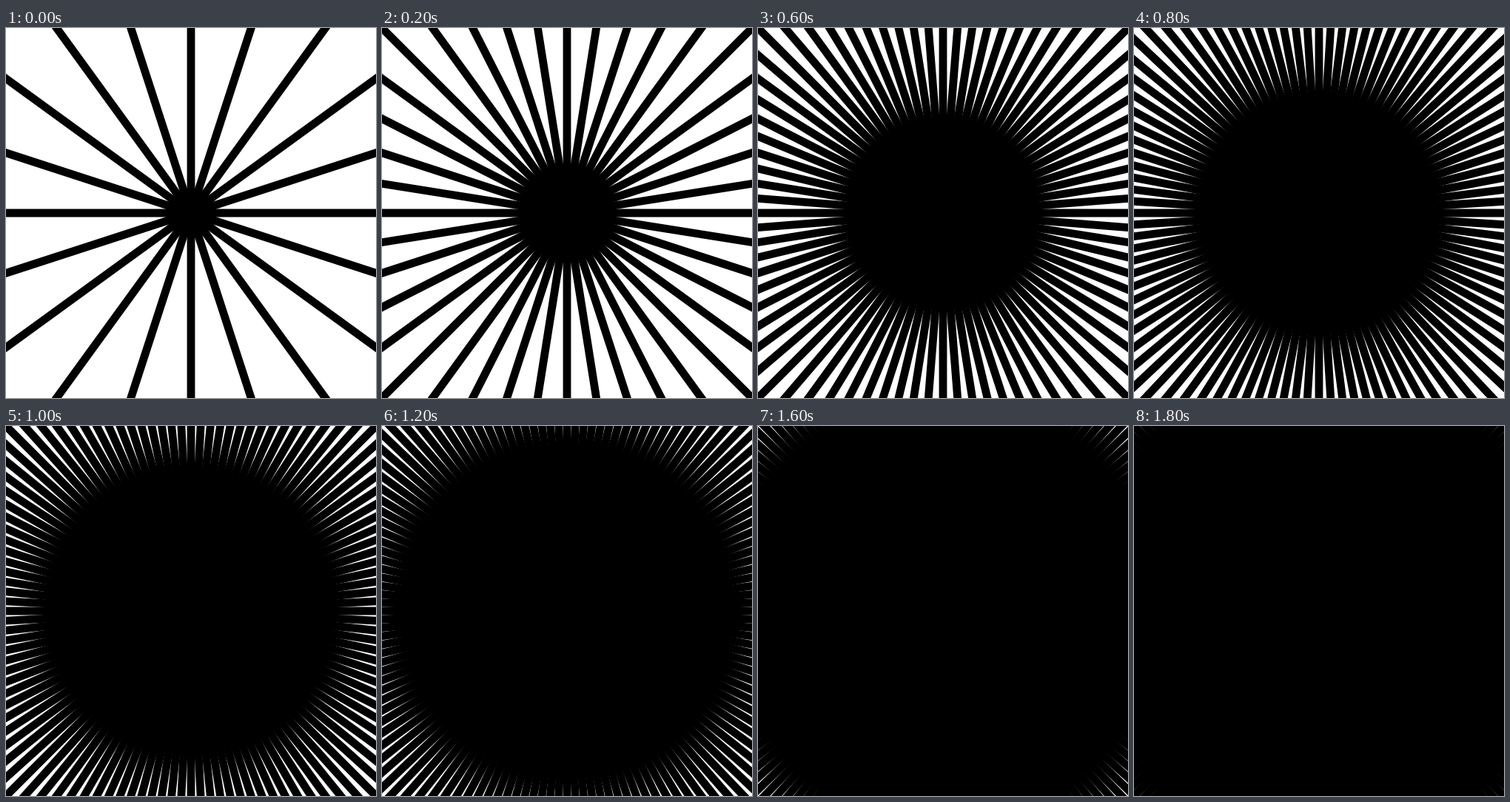
Write an HTML page with a canvas that moves like this. It is 500 px wide and 500 px high and loops after 2 s.

```html
<!DOCTYPE html>
<html lang="en">
<head>
<meta charset="utf-8">
<title>Rays</title>
<style>
  html, body { margin: 0; width: 100%; height: 100%; overflow: hidden; background: #fff; }
  canvas { display: block; width: 500px; height: 500px; }
</style>
</head>
<body>
<canvas id="stage" width="500" height="500"></canvas>
<script>
const SIZE = 500, CENTER = SIZE / 2, REACH = 400;
const STEPS = 10, STEP_MS = 200, RAYS_PER_STEP = 20, RAY_WIDTH = 10.8;

const ctx = document.getElementById('stage').getContext('2d');
const start = performance.now();
let shown = -1;

function drawRays(count) {
  ctx.fillStyle = '#fff';
  ctx.fillRect(0, 0, SIZE, SIZE);
  ctx.strokeStyle = '#000';
  ctx.lineWidth = RAY_WIDTH;
  // Each line crosses the centre, so it makes two opposite rays.
  for (let i = 0; i < count / 2; i++) {
    const angle = i * 2 * Math.PI / count;
    const dx = REACH * Math.cos(angle), dy = REACH * Math.sin(angle);
    ctx.beginPath();
    ctx.moveTo(CENTER - dx, CENTER - dy);
    ctx.lineTo(CENTER + dx, CENTER + dy);
    ctx.stroke();
  }
}

function tick() {
  const elapsed = Math.max(0, performance.now() - start);
  const step = Math.floor(elapsed / STEP_MS) % STEPS;
  if (step !== shown) {
    shown = step;
    drawRays((step + 1) * RAYS_PER_STEP);
  }
  requestAnimationFrame(tick);
}
tick();
</script>
</body>
</html>
```
